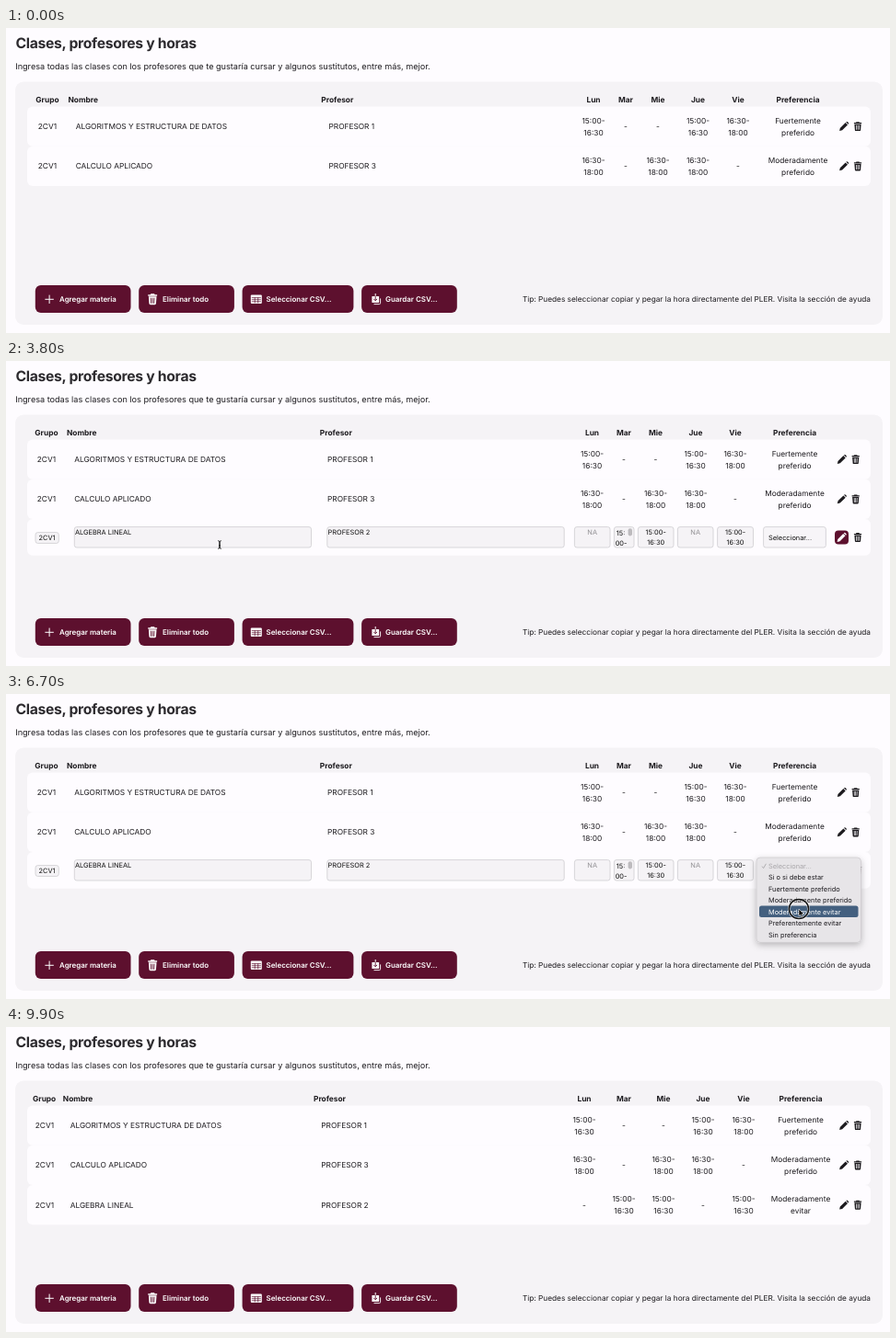
An HTML page that plays this animation: 960x332 px, repeating every 10000 ms.

```html
<!DOCTYPE html>
<html lang="es">
<head>
<meta charset="utf-8">
<title>Clases, profesores y horas</title>
<style>
html, body { margin: 0; width: 100%; height: 100%; overflow: hidden; background: #fefcff; }
svg { display: block; width: 960px; height: 332px; }
text { font-family: Inter, "Liberation Sans", sans-serif; font-size: 8.27px; fill: #1d1b1f; font-optical-sizing: none; text-rendering: geometricPrecision; white-space: pre; }
.title { font-size: 15.7px; font-weight: 700; letter-spacing: -.3px; fill: #2c2a2e; }
.sub { font-size: 9.12px; }
.head { font-weight: 700; font-size: 8.35px; }
.cell { font-size: 8.32px; }
.btn { font-size: 7.95px; font-weight: 600; fill: #fff; }
.field { font-size: 7.4px; fill: #111; }
.hint { font-size: 7.4px; fill: #908e92; }
.item { font-size: 7.35px; fill: #1d1b1f; }
.off { fill: #a9a7aa; }
.on { fill: #fff; }
</style>
</head>
<body>
<svg id="stage" viewBox="0 0 960 332" xmlns="http://www.w3.org/2000/svg">
  <defs>
    <path id="pencil" d="M-4.9 4.9l.7-3 5.9-5.9 2.3 2.3-5.9 5.9zM2.3-4.6l.5-.4q.5-.4 1 0l1.2 1.2q.4.5 0 1l-.5.5z"/>
    <g id="trash">
      <path d="M-1.5-4.9h3l.6.8h2v1.2h-8.2v-1.2h2z"/>
      <path fill-rule="evenodd" d="M-3.6-2.4h7.2l-.5 6.5q-.1.9-1 .9h-4.2q-.9 0-1-.9zM-1.9-1.3l.2 5h.7l-.2-5zM-.35-1.3v5h.7v-5zM1.2-1.3l-.2 5h.7l.2-5z"/>
    </g>
    <filter id="shade" x="-20%" y="-20%" width="140%" height="150%">
      <feDropShadow dx="0" dy="2.5" stdDeviation="3.5" flood-color="#000" flood-opacity=".25"/>
    </filter>
  </defs>
</svg>
<script>
const LOOP = 10000;
const INK = '#1d1b1f', WINE = '#5d102e', ROW = '#fefcff', PANEL = '#f5f3f6';
const stage = document.getElementById('stage');

function el(tag, attrs, parent = stage, content) {
  const e = document.createElementNS('http://www.w3.org/2000/svg', tag);
  for (const k in attrs) e.setAttribute(k, attrs[k]);
  if (content !== undefined) e.textContent = content;
  parent.appendChild(e);
  return e;
}
const group = (parent = stage) => el('g', {}, parent);
const box = (x, y, x2, y2, r, fill, parent, more = {}) =>
  el('rect', { x, y, width: x2 - x, height: y2 - y, rx: r, fill, ...more }, parent);
const text = (x, y, s, cls, parent, anchor = 'start') =>
  el('text', { x, y, class: cls, 'text-anchor': anchor }, parent, s);
const mid = (x, y, s, cls, parent) => text(x, y, s, cls, parent, 'middle');
const icon = (id, x, y, fill, parent, size = 1) =>
  el('use', { href: '#' + id, transform: `translate(${x} ${y}) scale(${size})`, fill }, parent);
const show = (e, on) => e.setAttribute('display', on ? 'inline' : 'none');

// Page, panel and buttons
text(10.5, 22.4, 'Clases, profesores y horas', 'title');
text(10.2, 45.2, 'Ingresa todas las clases con los profesores que te gustaría cursar y algunos sustitutos, entre más, mejor.', 'sub');
box(10, 58.5, 952, 323, 9, PANEL);
text(939, 298.4, 'Tip: Puedes seleccionar copiar y pegar la hora directamente del PLER. Visita la sección de ayuda', '', stage, 'end');

for (const [x, x2, tx, label] of [
  [31.8, 135.5, 58, 'Agregar materia'],
  [144.2, 247.9, 170, 'Eliminar todo'],
  [256.6, 377.4, 282.5, 'Seleccionar CSV...'],
  [386.1, 489.8, 412, 'Guardar CSV...']
]) {
  box(x, 280, x2, 310, 6, WINE);
  text(tx, 298.3, label, 'btn');
}
el('path', { d: 'M42.4 295.3h9.4M47.1 290.6v9.4', stroke: '#fff', 'stroke-width': 1, fill: 'none' });
icon('trash', 159.2, 295.2, '#fff', stage, 1.2);
box(265.8, 290.6, 277.8, 300, 1, '#fff');
el('path', { d: 'M266.8 293.6h10.1M266.8 295.7h10.1M266.8 297.8h10.1M270.2 293.4v6M273.7 293.4v6', stroke: WINE, 'stroke-width': .7 });
el('path', { d: 'M398 292h6.5q.6 0 .6.6v5.8q0 .6-.6.6H398q-.6 0-.6-.6v-5.8q0-.6.6-.6z', fill: '#fff' });
el('path', { d: 'M401.2 289v2.8', stroke: '#fff', 'stroke-width': 1, fill: 'none' });
el('path', { d: 'M401.2 292v4.6M399.3 294.9l1.9 1.9 1.9-1.9', stroke: WINE, 'stroke-width': .9, fill: 'none' });
el('path', { d: 'M399.5 300.6h5.9q1.2 0 1.2-1.2v-5', stroke: '#fff', 'stroke-width': .9, fill: 'none' });

// Tables
const A = '15:00-16:30', B = '16:30-18:00', N = '-';
const classes = [
  ['ALGORITMOS Y ESTRUCTURA DE DATOS', 'PROFESOR 1', [A, N, N, A, B], 'Fuertemente preferido'],
  ['CALCULO APLICADO', 'PROFESOR 3', [B, N, B, B, N], 'Moderadamente preferido'],
  ['ALGEBRA LINEAL', 'PROFESOR 2', [N, A, A, N, A], 'Moderadamente evitar']
];
const days = ['Lun', 'Mar', 'Mie', 'Jue', 'Vie'];

function pair(x, y, a, b, parent) {
  mid(x, y - 3.6, a, 'cell', parent);
  mid(x, y + 9.7, b, 'cell', parent);
}

function table(count, c) {
  const g = group();
  ['Grupo', 'Nombre', 'Profesor'].forEach((s, i) => text(c.head[i], 81.4, s, 'head', g));
  days.forEach((d, i) => mid(c.days[i], 81.4, d, 'head', g));
  mid(c.pref, 81.4, 'Preferencia', 'head', g);
  classes.slice(0, count).forEach(([name, prof, hours, pref], i) => {
    const top = 85.4 + i * 43.3, y = top + 21.7;
    box(23, top, 939, top + 43.3, 6, ROW, g);
    ['2CV1', name, prof].forEach((s, k) => text(c.cell[k], y + 3, s, 'cell', g));
    hours.forEach((h, d) => {
      if (h === N) mid(c.days[d], y + 3, h, 'cell', g);
      else pair(c.days[d], y, h.slice(0, 6), h.slice(6), g);
    });
    pair(c.pref, y, ...pref.split(' '), g);
    icon('pencil', c.icon, y, INK, g);
    icon('trash', c.icon + 15, y, INK, g);
  });
  return g;
}

const first = table(2, { head: [32.3, 67.5, 342.3], cell: [34.8, 75.7, 350.5], days: [638, 673, 708, 751.5, 795], pref: 860, icon: 910 });
const edit = table(2, { head: [31.3, 66, 340.8], cell: [33.8, 74.2, 349], days: [636.5, 671, 705.5, 749, 792], pref: 856.5, icon: 907.7 });
const last = table(3, { head: [29, 61.8, 334], cell: [31.8, 69.7, 342.3], days: [628, 671, 714, 757, 801], pref: 863, icon: 910 });

// Row being edited
const LINE = { stroke: '#cfcdd1', 'stroke-width': .8 };
const frame = (x, x2, y = 180.6, y2 = 203) => box(x, y, x2, y2, 2.5, PANEL, edit, LINE);
box(23, 172, 939, 211.7, 6, ROW, edit);
frame(32, 57.3, 186.6, 198.4);
frame(74.3, 331.5);
frame(348.8, 606.2);
const cols = [[617.4, 656], [660.4, 682], [686.4, 725], [729.4, 768], [772.6, 811.5]];
cols.forEach(c => frame(...c));
const centers = cols.map(([a, b]) => (a + b) / 2);

const empty = group(edit), full = group(edit);
mid(44.6, 195.2, 'Grupo', 'hint', empty);
text(75, 189.3, 'Nombre', 'hint', empty);
text(349.6, 189.3, 'Profesor', 'hint', empty);
[1, 2, 4].forEach(i => mid(centers[i], 189.3, 'NA', 'hint', empty));
[0, 3].forEach(i => mid(centers[i], 189.3, 'NA', 'hint', edit));

mid(44.6, 195.2, '2CV1', 'field', full);
text(75, 189.3, 'ALGEBRA LINEAL', 'field', full);
text(349.6, 189.3, 'PROFESOR 2', 'field', full);
[2, 4].forEach(i => {
  mid(centers[i], 189.3, '15:00-', 'field', full);
  mid(centers[i], 200.2, '16:30', 'field', full);
});
mid(667.5, 189.8, '15:', 'field', full);
mid(668, 200.8, '00-', 'field', full);
box(675.6, 182.2, 680, 190.4, 2.1, '#bdbbbe', full);

const plain = group(edit), chosen = group(edit);
box(822.6, 180.6, 890.4, 203, 2.5, '#f7f5f8', plain, LINE);
text(828, 194.5, 'Seleccionar...', 'field', plain);
box(821.8, 180, 891.3, 203.8, 3.5, '#8f8d91', chosen);
box(822.4, 180.6, 890.7, 203.2, 3, '#f7f5f8', chosen, { stroke: '#343236', 'stroke-width': 1.1 });
text(828, 194.5, 'Moderadamente', 'field', chosen);

box(900, 184.4, 915, 199.6, 4, WINE, edit);
icon('pencil', 907.5, 192, '#fff', edit);
icon('trash', 925, 192, INK, edit);

// Dropdown
const menu = group();
box(815, 178, 928.5, 270.4, 4, '#e7e5e8', menu, { stroke: '#c4c2c5', 'stroke-width': .6, filter: 'url(#shade)' });
const bar = box(818, 0, 925.5, 12.4, 2.5, '#44607f', menu);
el('path', { d: 'M821 187.6l1.6 2 2.8-4.8', stroke: '#a9a7aa', 'stroke-width': .9, fill: 'none' }, menu);
const items = ['Seleccionar...', 'Si o si debe estar', 'Fuertemente preferido', 'Moderadamente preferido',
  'Moderadamente evitar', 'Preferentemente evitar', 'Sin preferencia']
  .map((s, i) => text(828, 189.8 + i * 12.45, s, 'item', menu));

// Pointer
const pointer = group();
const ring = group(pointer);
el('circle', { r: 10.6, fill: 'none', stroke: '#fff', 'stroke-width': 3, opacity: .6 }, ring);
el('circle', { r: 10.6, fill: 'none', stroke: '#111', 'stroke-width': 1.5 }, ring);
const arrow = el('path', { d: 'M0 0v7.9l1.8-1.7 1.2 2.8 1.4-.6-1.2-2.7h2.5z', fill: '#000', stroke: '#fff', 'stroke-width': .6 }, pointer);
const beam = el('path', { d: 'M-1.8-4.3q1.8 0 1.8 1.2v6.2q0 1.2-1.8 1.2M1.8-4.3q-1.8 0-1.8 1.2v6.2q0 1.2 1.8 1.2M-1 .9h2', fill: 'none', stroke: '#111', 'stroke-width': .9 }, pointer);

// time, x, y
const path = [
  [600, 104, 345], [1300, 88, 297], [1700, 88, 297], [2600, 227, 205], [2900, 232, 200],
  [4000, 232, 200], [5000, 869, 189], [6000, 869, 189], [6500, 861, 234], [7100, 861, 234],
  [7900, 886, 211.5], [8400, 907, 193], [8700, 907, 193], [9400, 858, 110], [9900, 800, -14]
];
const clicks = [1500, 5200, 6600, 8400];
const within = (t, a, b) => t >= a && t < b;

function place(t) {
  const i = path.findIndex(p => p[0] > t);
  if (i < 1) return path[i < 0 ? path.length - 1 : 0].slice(1);
  const [t0, x0, y0] = path[i - 1], [t1, x1, y1] = path[i];
  const u = (t - t0) / (t1 - t0), k = u * u * (3 - 2 * u);
  return [x0 + (x1 - x0) * k, y0 + (y1 - y0) * k];
}

function draw(now) {
  const t = Math.floor((now % LOOP) / 100) * 100;
  const editing = within(t, 1600, 8600);
  show(first, t < 1600);
  show(edit, editing);
  show(last, t >= 8600);

  show(empty, t < 3000);
  show(full, t >= 3000);
  show(plain, t < 6900);
  show(chosen, t >= 6900);

  const [x, y] = place(t);
  const open = within(t, 5300, 6900);
  show(menu, open);
  const row = Math.floor((y - 180.8) / 12.45);
  const hot = open && row > 0 ? row : -1;
  show(bar, hot > 0);
  bar.setAttribute('y', 180.8 + hot * 12.45);
  items.forEach((e, i) => e.setAttribute('class', 'item' + (i === hot ? ' on' : i ? '' : ' off')));

  show(pointer, within(t, 600, 9900));
  pointer.setAttribute('transform', `translate(${x.toFixed(2)} ${y.toFixed(2)})`);
  const overField = editing && within(y, 181, 203) &&
    [[74, 331], [349, 606], ...cols].some(([a, b]) => within(x, a, b));
  show(beam, overField);
  show(arrow, !overField);
  show(ring, clicks.some(c => within(t, c, c + 300)));
}

const begin = performance.now();
function tick() {
  draw(performance.now() - begin);
  requestAnimationFrame(tick);
}
tick();
</script>
</body>
</html>
```
